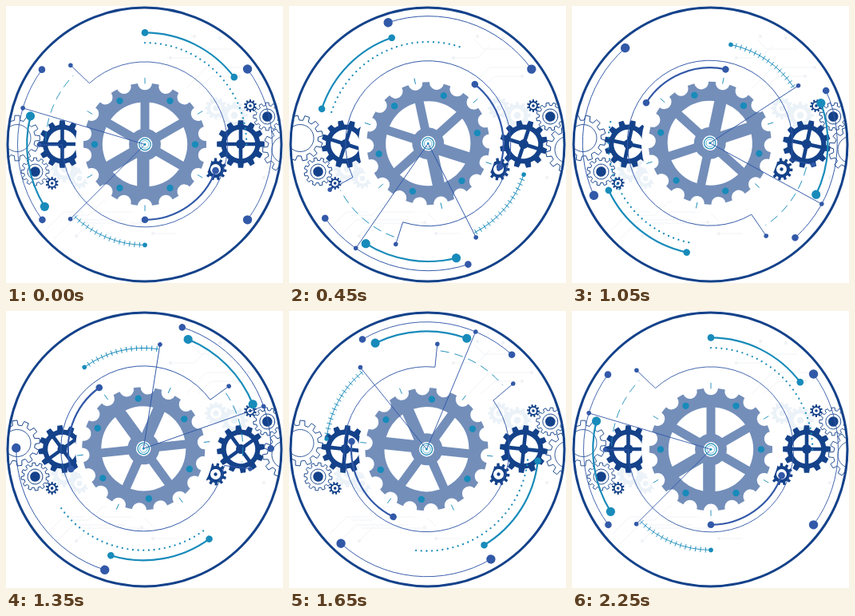
These frames come from a looping animation (347 by 347 pixels, 2.4 s). An HTML page:

```html
<!DOCTYPE html>
<html lang="en">
<head>
<meta charset="utf-8">
<title>Rotating gears</title>
<style>
html, body { margin: 0; width: 100%; height: 100%; overflow: hidden; background: #fff; }
svg { display: block; width: 100vw; height: 100vh; }
</style>
</head>
<body>
<svg id="stage" viewBox="0 0 347 347"></svg>
<script>
const NAVY = '#14428a', BLUE = '#3259a8', TEAL = '#188bba', STEEL = '#738eb9';
const STEP = 150, STEPS = 15;
const range = (n, fn) => Array.from({ length: n }, (_, i) => fn(i)).join('');

// Angles are clockwise degrees from the top.
const at = (r, deg) => {
  const a = deg * Math.PI / 180;
  return [+(r * Math.sin(a)).toFixed(2), +(-r * Math.cos(a)).toFixed(2)];
};
const path = (d, stroke, width, extra = '') =>
  `<path d="${d}" fill="none" stroke="${stroke}" stroke-width="${width}" ${extra}/>`;
const arcPath = (r, a, b) => `M${at(r, a)}A${r} ${r} 0 ${b - a > 180 ? 1 : 0} 1 ${at(r, b)}`;
const arc = (r, a, b, stroke, width, extra) => path(arcPath(r, a, b), stroke, width, extra);
const dot = (r, a, size, fill) => {
  const [x, y] = at(r, a);
  return `<circle cx="${x}" cy="${y}" r="${size}" fill="${fill}"/>`;
};
const disc = (r, fill, stroke = 'none', width = 1) =>
  `<circle r="${r}" fill="${fill}" stroke="${stroke}" stroke-width="${width}"/>`;
const ray = (a, r1, r2, stroke, width) => path(`M${at(r1, a)}L${at(r2, a)}`, stroke, width);

function toothed(n, outer, inner) {
  const s = 360 / n;
  return 'M' + Array.from({ length: n }, (_, i) => [
    at(inner, (i - 0.3) * s), at(outer, (i - 0.2) * s),
    at(outer, (i + 0.2) * s), at(inner, (i + 0.3) * s)
  ].join('L')).join('L') + 'Z';
}
const cog = (n, outer, inner, fill, stroke = 'none') =>
  `<path d="${toothed(n, outer, inner)}" fill="${fill}" stroke="${stroke}" stroke-width="0.9"/>`;
const spinAt = (x, y, body) => `<g transform="translate(${x} ${y})"><g class="spin">${body}</g></g>`;

const wheel = cog(12, 30, 24.5, NAVY) + disc(18.3, '#fff') +
  range(4, i => ray(i * 90, 0, 20, NAVY, 4.6)) + disc(6, NAVY);
const outlineBig = cog(12, 28.5, 22.5, '#fff', NAVY) + disc(17, 'none', NAVY, 0.8);
const outlineSmall = cog(12, 17.5, 14, '#fff', NAVY) + disc(9.5, '#fff', NAVY, 0.9) + disc(6.3, NAVY);
const tiny = cog(10, 8, 5.8, NAVY) + disc(4, '#fff') + disc(1.8, NAVY);
const pinion = cog(11, 14, 10.5, NAVY) + disc(6.5, '#fff') + disc(2.2, NAVY);

function backdrop() {
  const ghost = (x, y, r) => `<g transform="translate(${x} ${y})">` +
    cog(12, r, r * 0.8, '#ebf2f8') + disc(r * 0.5, '#fff') + disc(r * 0.25, '#ebf2f8') + '</g>';
  const traces = [
    'M226 103L251 77H304', 'M240 104L258 88H292', 'M206 65H236L252 49', 'M232 42L244 54H282',
    'M78 262H104L121 245H146', 'M60 292L84 268H150', 'M50 280L72 258H98', 'M92 272H168',
    'M88 288L106 270', 'M116 258H172L184 270', 'M184 285H214'
  ];
  const ends = [[304, 77], [292, 88], [206, 65], [236, 38], [268, 40], [146, 245],
    [170, 271], [88, 288], [184, 285], [323, 215]];
  return path(traces.join(''), '#f1f3f6', 1) +
    ends.map(([x, y]) => `<circle cx="${x}" cy="${y}" r="2.2" fill="#f1f3f6"/>`).join('') +
    ghost(263, 128, 14) + ghost(286, 137, 17) + ghost(92, 216, 13) + ghost(73, 204, 17);
}

function mainGear() {
  const r = 77, half = 6.7, hub = 20, rim = 53;
  const edge = 'M' + at(r, -half) + range(18, i =>
    `A9 9 0 0 0 ${at(r, i * 20 + half)}A${r} ${r} 0 0 1 ${at(r, i * 20 + 20 - half)}`) + 'Z';
  // Window between two spokes, each cutting in by a given half width.
  const pane = (mid, cut) => {
    const near = 30 - Math.asin(cut / hub) * 180 / Math.PI;
    const far = 30 - Math.asin(cut / rim) * 180 / Math.PI;
    return `M${at(hub, mid - near)}L${at(rim, mid - far)}A${rim} ${rim} 0 0 1 ${at(rim, mid + far)}` +
      `L${at(hub, mid + near)}A${hub} ${hub} 0 0 0 ${at(hub, mid - near)}Z`;
  };
  const panes = range(6, i => pane(i * 60 + 30, i === 3 ? 9.8 : 5.5));
  return `<path d="${edge}" fill="${STEEL}"/><path d="${panes}" fill="#fff"/>` +
    range(6, i => dot(63, i * 60 + 30, 4.2, TEAL) + ray(i * 60, 76, 83.5, TEAL, 0.9)) +
    disc(9.3, '#fff') + disc(7.2, '#fff', TEAL, 1.2) + disc(4.8, 'none', TEAL, 0.6);
}

function dial() {
  const thin = 0.9;
  return mainGear() +
    // notched ring
    arc(103.5, -42.2, 269.8, BLUE, thin) +
    path(`M${at(103.5, -42.2)}L${at(136, -43.2)}M${at(103.5, 269.8)}L${at(132.5, 269.8)}`, BLUE, thin) +
    dot(136, -43.2, 2.8, BLUE) + dot(132.5, 269.8, 2.8, BLUE) +
    arc(124.5, 272, 314, TEAL, 0.9, 'stroke-dasharray="11 7"') +
    // hands
    ray(286.6, 0, 159.5, BLUE, thin) + dot(159.5, 286.6, 2.8, BLUE) +
    ray(225, 0, 132, BLUE, thin) + dot(132, 225, 2.8, BLUE) + disc(1.4, TEAL) +
    // outer thin arcs
    arc(159.5, 233.7, 306, BLUE, thin) + dot(159.5, 233.7, 4.3, BLUE) + dot(159.5, 306, 4.3, BLUE) +
    arc(159.5, 53.7, 126.3, BLUE, thin) + dot(159.5, 53.7, 5.7, BLUE) + dot(159.5, 126.3, 5.7, BLUE) +
    // thick arcs
    arc(140, 0, 53, TEAL, 2.2) + dot(140, 0, 4.3, TEAL) + dot(140, 53, 4.3, TEAL) +
    arc(147.8, 238.2, 283.9, TEAL, 2.2) + dot(147.8, 238.2, 5.6, TEAL) + dot(147.8, 283.9, 5.6, TEAL) +
    arc(94.4, 110.3, 180, BLUE, 2.2) + dot(94.4, 110.3, 4.3, BLUE) + dot(94.4, 180, 4.3, BLUE) +
    // dotted and ticked arcs
    range(31, i => dot(127.3, i * 3, 1.15, TEAL)) +
    arc(126, 180, 224.5, TEAL, 0.9) + dot(126, 180, 2.8, TEAL) +
    range(15, i => ray(183 + i * 2.9, 122.7, 129.3, TEAL, 0.9));
}

const stage = document.getElementById('stage');
stage.innerHTML = `
  <defs><clipPath id="disc"><circle cx="173.5" cy="173.5" r="171.5"/></clipPath></defs>
  <rect width="347" height="347" fill="#fff"/>
  <g clip-path="url(#disc)">
    ${backdrop()}
    ${spinAt(14, 165.5, outlineBig)}${spinAt(70.5, 173, wheel)}
    ${spinAt(36.5, 207.5, outlineSmall)}${spinAt(57.7, 222, tiny)}
    ${spinAt(350, 180, outlineBig)}${spinAt(327.3, 138.5, outlineSmall)}
    ${spinAt(306, 125, tiny)}${spinAt(262.5, 204.5, pinion)}
    <circle cx="173.5" cy="173" r="86.5" fill="#fff"/>
    ${spinAt(294, 173, wheel)}
    <g id="dial"><g transform="translate(174 173.4)">${dial()}</g></g>
  </g>
  <circle cx="173.5" cy="173.5" r="171.5" fill="none" stroke="${NAVY}" stroke-width="3"/>`;

const face = document.getElementById('dial');
const spinners = [...document.querySelectorAll('.spin')];

function draw(ms) {
  // The closing step repeats the opening pose.
  const k = Math.floor(ms / STEP) % (STEPS + 1);
  const angle = -360 * k / STEPS;
  face.setAttribute('transform', `rotate(${angle} 173.3 172.6)`);
  spinners.forEach(g => g.setAttribute('transform', `rotate(${angle})`));
}

const start = performance.now();
function loop() {
  draw(performance.now() - start);
  requestAnimationFrame(loop);
}
draw(0);
requestAnimationFrame(loop);
</script>
</body>
</html>
```
